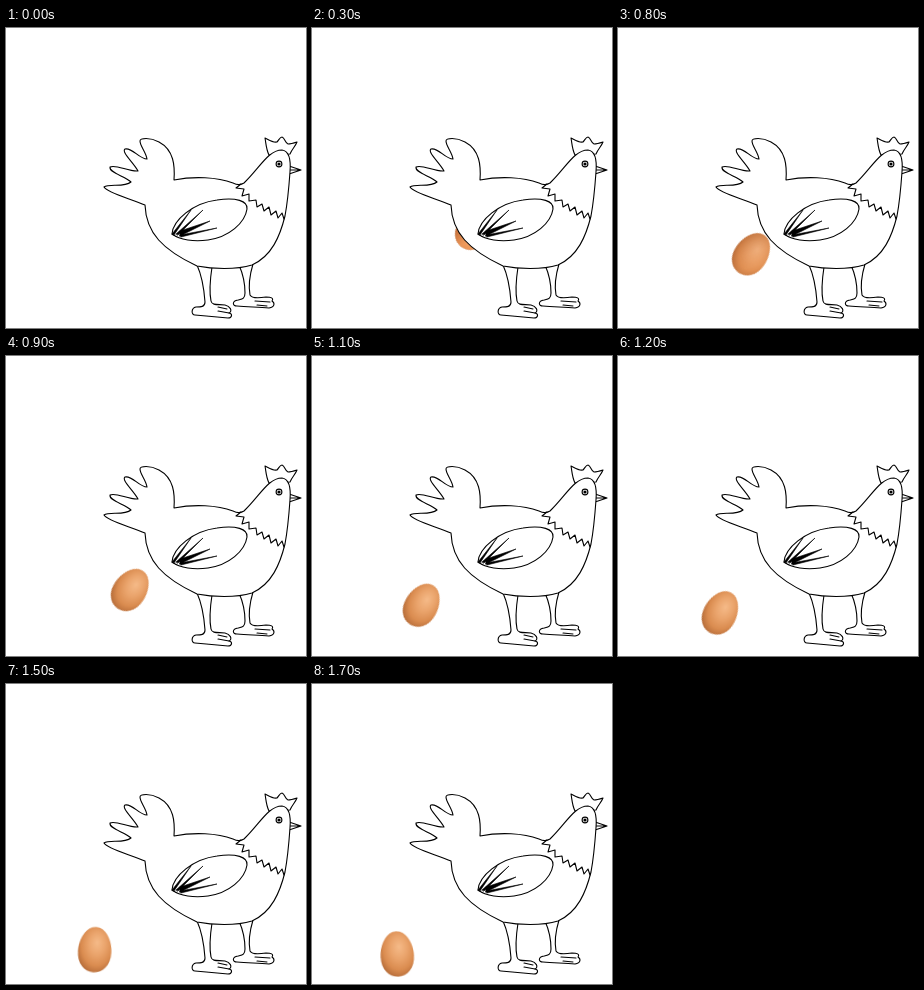
These frames come from a looping animation (300 px wide and 300 px high, 1800 ms). An HTML page:

```html
<!DOCTYPE html>
<html lang="en">
<head>
<meta charset="utf-8">
<title>Hen and egg</title>
<style>
  html, body { margin: 0; width: 100%; height: 100%; overflow: hidden; background: #fff; }
  svg { display: block; width: 100vw; height: 100vh; }
  .hen { fill: #fff; stroke: #000; stroke-width: 1.1; stroke-linejoin: round; stroke-linecap: round; }
  .line { fill: none; }
  .quill { fill: #000; stroke-width: .6; }
  .pupil { fill: #000; stroke: none; }
  .egg { animation: lay 1800ms infinite; }
  .shade { animation: clear 1800ms infinite; }

  /* One pose every 100 ms */
  @keyframes lay {
    0% { transform: translate(174px, 191px) rotate(38deg); animation-timing-function: steps(3, end); }
    16.6667% { transform: translate(163px, 200.7px) rotate(38deg); animation-timing-function: steps(3, end); }
    33.3333% { transform: translate(152px, 210.5px) rotate(36deg); animation-timing-function: steps(3, end); }
    50% { transform: translate(124.3px, 233.7px) rotate(34deg); animation-timing-function: steps(3, end); }
    66.6667% { transform: translate(102.5px, 256.7px) rotate(27deg); animation-timing-function: steps(2, end); }
    77.7778% { transform: translate(90.6px, 263.5px) rotate(7deg); animation-timing-function: steps(3, end); }
    94.4444%, 100% { transform: translate(85.2px, 270px) rotate(-3deg); }
  }
  @keyframes clear {
    0%, 33.3333% { opacity: 1; animation-timing-function: steps(3, end); }
    50%, 100% { opacity: 0; }
  }
</style>
</head>
<body>
<svg viewBox="0 0 300 300">
  <defs>
    <radialGradient id="shell" cx=".56" cy=".4" r=".62" fx=".56" fy=".34">
      <stop offset="0" stop-color="#f5ba88"/>
      <stop offset=".4" stop-color="#eaa46c"/>
      <stop offset=".75" stop-color="#da8c50"/>
      <stop offset="1" stop-color="#b96f3b"/>
    </radialGradient>
    <linearGradient id="shadow" x1=".1" y1=".2" x2=".65" y2=".8">
      <stop offset="0" stop-color="#94461c" stop-opacity=".85"/>
      <stop offset=".6" stop-color="#d87840" stop-opacity=".5"/>
      <stop offset="1" stop-color="#ffa665" stop-opacity=".65"/>
    </linearGradient>
    <path id="oval" d="M0-22.7C9.5-22.7 16.7-10.5 16.7 2.2C16.7 14.5 9.5 22.7 0 22.7C-9.5 22.7-16.7 14.5-16.7 2.2C-16.7-10.5-9.5-22.7 0-22.7Z"/>
  </defs>

  <g class="egg">
    <use href="#oval" fill="url(#shell)"/>
    <use class="shade" href="#oval" fill="url(#shadow)"/>
  </g>

  <g class="hen">
    <!-- legs -->
    <path d="M191 237C196 248 198 260 199 274C199 279 195 279 190 279C185 280 185 287 189 287C200 288 212 289 222 290C226 290 227 286 223 285C227 283 224 278 219 277C213 276 206 278 205 273C203 263 204 252 206 239"/>
    <path d="M233 237C237 246 239 256 239 265C239 271 236 271 232 272C226 273 226 278 231 278C242 279 252 279 263 280C269 279 269 275 266 273C268 270 265 269 260 269C254 270 246 271 244 267C242 256 244 246 247 236"/>
    <path class="line" d="M212 283L223 285M212 279L221 281M249 273L264 274M251 277L261 278"/>

    <!-- comb and beak -->
    <path d="M263 127C260 121 260 115 259 110C263 112 267 115 271 114C273 112 274 109 276 109C279 110 279 115 282 116C285 116 288 115 291 114C289 119 286 121 284 126Z"/>
    <path d="M283 138L295 142L283 146M284 142L295 142"/>

    <!-- body and tail -->
    <path d="M168 152C169 138 168 122 153 114C144 109 134 110 134 113C134 118 140 124 141 131C133 131 126 119 119 121C115 124 128 135 132 143C123 144 110 136 104 139C103 145 119 148 125 154C118 160 103 155 98 159C101 165 126 171 139 177C140 205 157 222 191 238C206 241 230 242 246 237C266 228 274 208 279 188C282 172 283 158 284 144C285 132 283 123 276 122C262 122 253 141 238 155C235 157 231 157 227 155C211 149 188 148 168 152Z"/>

    <!-- collar -->
    <path class="line" d="M235 156L230 160L238 161L236 168L243 166L243 173L250 172L251 179L256 176L258 183L263 179L265 187L270 183L272 190L276 185L278 191"/>

    <!-- wing -->
    <path d="M166 206C167 192 187 175 211 172C230 169 242 173 241 181C239 195 223 209 202 212C188 214 174 212 166 206Z"/>
    <path class="quill" d="M166 206L185 182L168 207ZM170 206L197 182L172 207ZM174 203L204 193L174 208ZM174 207L211 200L175 209Z"/>

    <!-- eye -->
    <circle cx="273" cy="136" r="2.9"/>
    <circle class="pupil" cx="273" cy="136" r="1.6"/>
  </g>
</svg>
</body>
</html>
```
